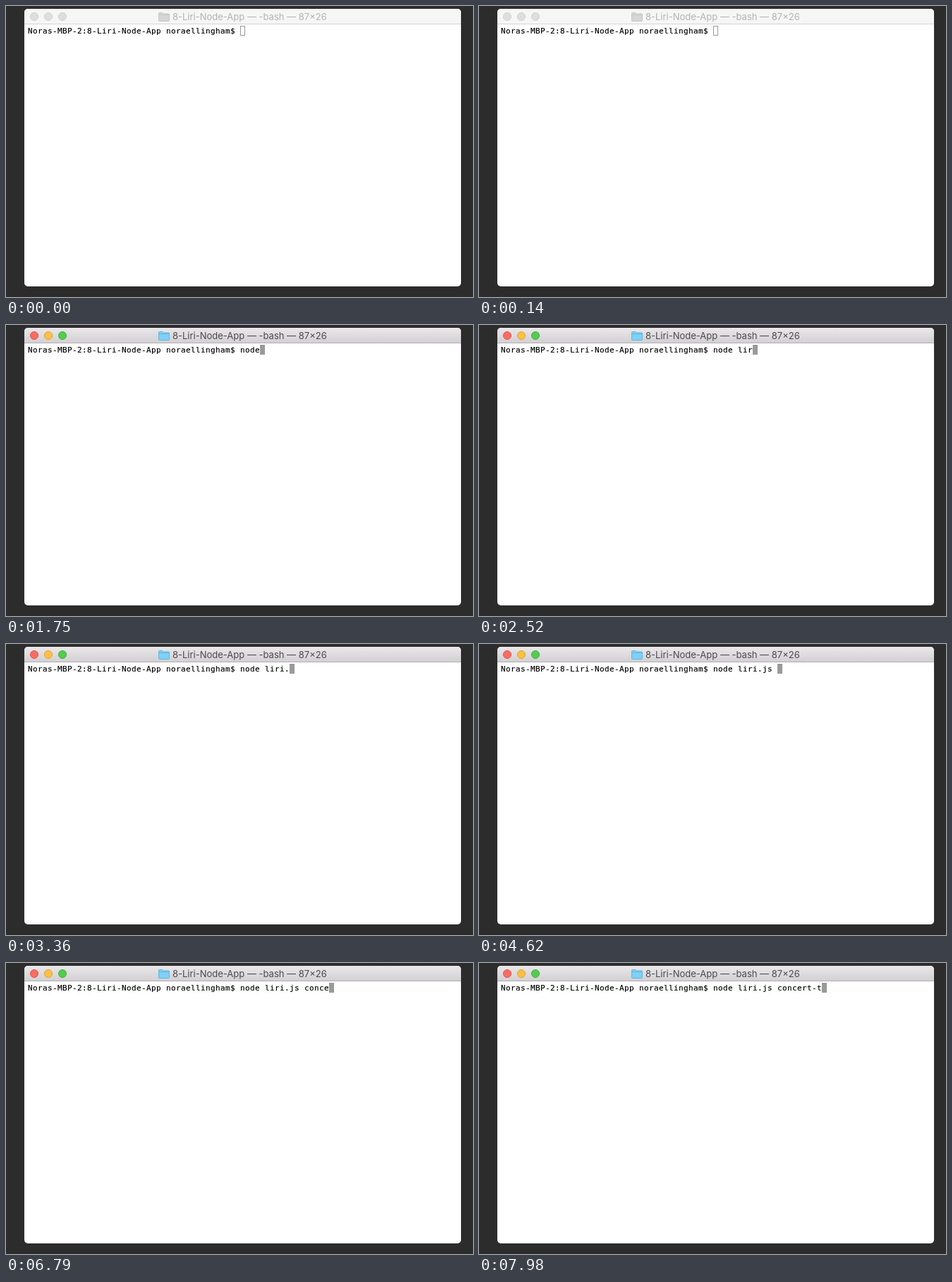
Write an HTML page that moves like this. It is 662 by 412 pixels and loops after 8 s.

```html
<!DOCTYPE html>
<html lang="en">
<head>
<meta charset="utf-8">
<title>Terminal typing</title>
<style>
  html, body { margin: 0; width: 100%; height: 100%; overflow: hidden; background: #2c2c2c; }
  svg { display: block; width: 662px; height: 412px; }
  text { white-space: pre; }
  .title { font: 13px Inter, Roboto, sans-serif; fill: #4c4a4c; }
  .shell { font: 11px "DejaVu Sans Mono", monospace; letter-spacing: .378px; fill: #000; stroke: #000; stroke-width: .15px; }
  .light { stroke-width: 1; }
  .folder { fill: #7fd0f7; stroke: #62b4dc; }
  .cursor { fill: #9a9a9a; stroke: #9a9a9a; }
  .idle .title { fill: #b4b3b4; }
  .idle .bar { fill: #f6f6f6; }
  .idle .rule { fill: #d4d4d4; }
  .idle .light { fill: #dedede; stroke: #d0d0d0; }
  .idle .folder { fill: #d6d6d6; stroke: #c6c6c6; }
  .idle .cursor { fill: none; }
</style>
</head>
<body>
<svg id="stage" class="idle" viewBox="0 0 662 412">
  <defs>
    <linearGradient id="chrome" x2="0" y2="1">
      <stop stop-color="#eae8ea"/>
      <stop offset="1" stop-color="#d2d0d2"/>
    </linearGradient>
  </defs>
  <rect width="662" height="412" fill="#2c2c2c"/>
  <rect x="26" y="4" width="619" height="393" rx="5" fill="#fff"/>
  <path class="bar" fill="url(#chrome)" d="M26 25V9a5 5 0 0 1 5-5H640a5 5 0 0 1 5 5V25Z"/>
  <rect class="rule" x="26" y="25" width="619" height="1" fill="#b3b1b3"/>
  <circle class="light" cx="40" cy="15" r="5.5" fill="#f96c63" stroke="#e2524a"/>
  <circle class="light" cx="60" cy="15" r="5.5" fill="#fcc043" stroke="#dfa333"/>
  <circle class="light" cx="80" cy="15" r="5.5" fill="#55cb4f" stroke="#3fae3b"/>
  <path class="folder" d="M216.5 20.5V10.5q0-1 1-1H222l1.5 1.5H230.500q1 0 1 1V20.500q0 1-1 1H217.500q-1 0-1-1ZM216.500 12.500H231.500"/>
  <text class="title" x="236" y="20">8-Liri-Node-App — -bash — 87×26</text>
  <text class="shell" id="line" x="31" y="39"></text>
  <rect class="cursor" id="cursor" y="28.5" width="6" height="13"/>
</svg>
<script>
  const LOOP = 8000, FOCUS = 560, LEFT = 31, CELL = 7;
  const PROMPT = "Noras-MBP-2:8-Liri-Node-App noraellingham$ ";
  const COMMAND = "node liri.js concert-t";
  // Moment of each keystroke in ms
  const KEYS = [
    1260, 1400, 1540, 1750, 1820, 2030, 2240, 2520, 2730, 3360, 3570,
    3710, 4620, 6300, 6370, 6510, 6580, 6790, 6930, 7210, 7840, 7980
  ];
  const [stage, line, cursor] = ["stage", "line", "cursor"].map(id => document.getElementById(id));

  function draw(t) {
    const typed = KEYS.filter(k => k <= t).length;
    const text = PROMPT + COMMAND.slice(0, typed);
    stage.classList.toggle("idle", t < FOCUS);
    if (line.textContent !== text) line.textContent = text;
    cursor.setAttribute("x", LEFT + text.length * CELL + 0.5);
  }

  const start = performance.now();
  function tick() {
    draw((performance.now() - start) % LOOP);
    requestAnimationFrame(tick);
  }
  tick();
</script>
</body>
</html>
```
